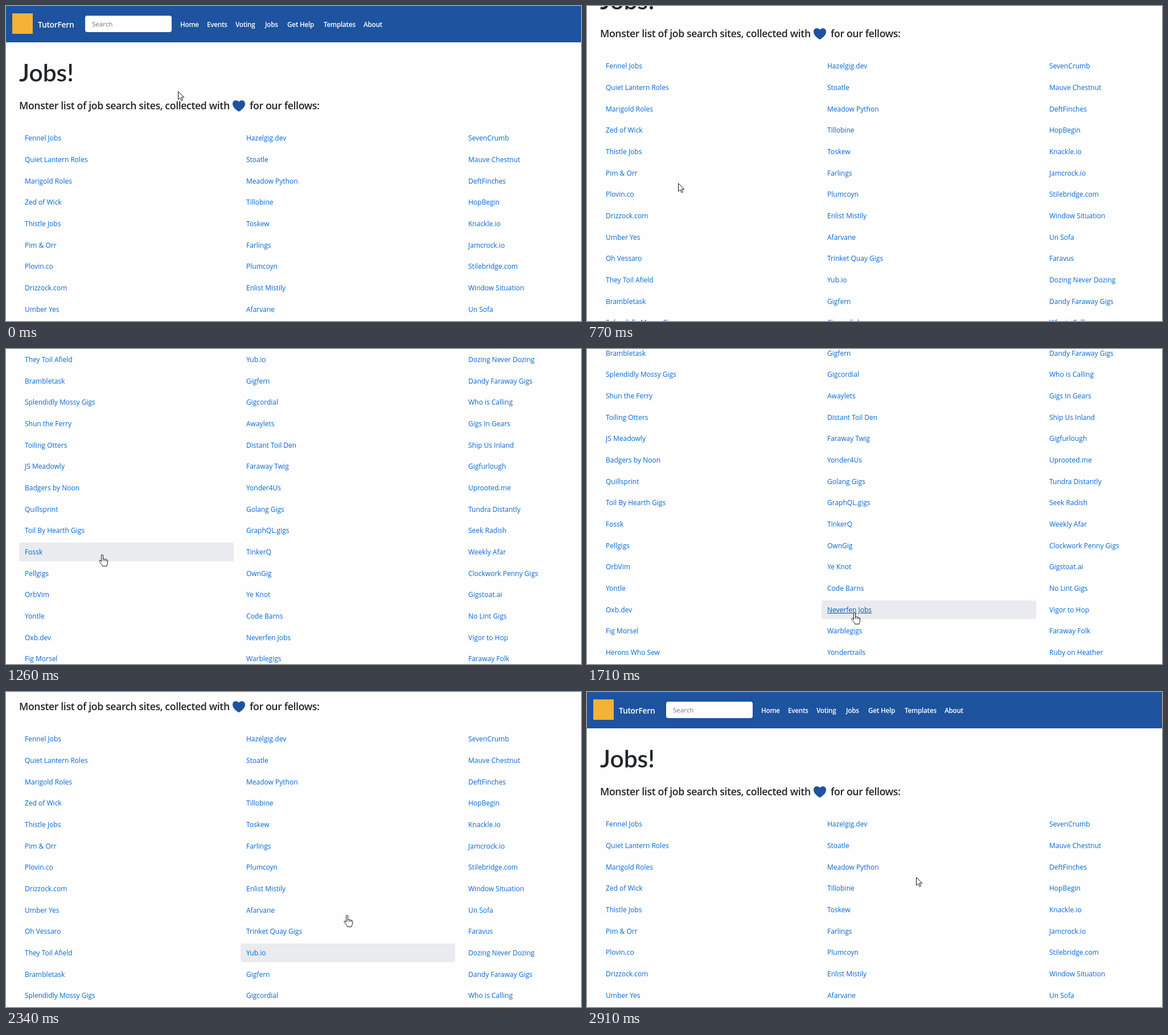
Recreate the animation shown at these times as an HTML page. Size 1010 by 555 pixels, loop 3.18 s.

```html
<!DOCTYPE html>
<html lang="en">
<head>
<meta charset="utf-8">
<title>Jobs</title>
<style>
html, body { margin: 0; width: 100%; height: 100%; overflow: hidden; background: #fefefe; }
#stage { position: relative; width: 1010px; height: 555px; overflow: hidden; font: 12px "Open Sans", "Noto Sans", sans-serif; color: #212529; }
#page { position: absolute; left: 0; top: 0; width: 1010px; height: 1220px; }
#page *, .cursor { position: absolute; white-space: pre; }
header { left: 0; top: 0; width: 1010px; height: 64px; background: #1d539f; color: #fff; font-weight: 600; letter-spacing: -.02em; }
header span { top: 17px; line-height: 31px; font-size: 11.7px; }
#page .brand { left: 56px; font-size: 13.8px; }
.logo { left: 11px; top: 13px; width: 36px; height: 36px; background: #f5b335; }
.search { left: 139px; top: 17px; width: 152px; height: 29px; border-radius: 4px; background: #fff; }
#page .search span { left: 12px; top: 0; line-height: 30px; font-size: 11.6px; font-weight: 400; letter-spacing: 0; color: #6c757d; }
h1, h2 { margin: 0; font-weight: 600; }
h1 { left: 23px; top: 87px; font-family: Lato, "Open Sans", sans-serif; font-size: 42.5px; line-height: 60px; }
h2 { top: 160px; font-size: 17.65px; line-height: 31px; letter-spacing: -.02em; }
.heart { left: 398px; top: 166px; }
.row { width: 377px; height: 33px; border-radius: 3px; line-height: 33px; }
.row.on { background: #e9ebef; }
.row a { left: 10px; top: 0; color: #0366d6; }
.row a.under { color: #0056b3; text-decoration: underline; }
.cursor { left: 0; top: 0; overflow: visible; fill: #fff; stroke: #111; stroke-width: 1; stroke-linejoin: round; }
</style>
</head>
<body>
<div id="stage">
  <div id="page">
    <header>
      <div class="logo"></div>
      <span class="brand">TutorFern</span>
      <div class="search"><span>Search</span></div>
    </header>
    <h1>Jobs!</h1>
    <h2 style="left:23px">Monster list of job search sites, collected with</h2>
    <svg class="heart" width="22" height="20" viewBox="0 0 22 20"><path fill="#1d539f" d="M11 3C9-1 0-1 0 6.5C0 12 5 16 9.5 19.3Q11 20.4 12.5 19.3C17 16 22 12 22 6.5C22-1 13-1 11 3Z"/></svg>
    <h2 style="left:428px">for our fellows:</h2>
  </div>
  <svg class="cursor" id="arrow" width="13" height="19"><path d="M.5.5V14.8L3.8 11.7L6.1 16.8L8.3 15.8L6 10.9H10.6Z"/></svg>
  <svg class="cursor" id="hand" width="17" height="22"><path d="M4.5 12.6V2a1.5 1.5 0 0 1 3 0V8C8.6 7 10.5 7.4 10.5 8.7C11.5 7.9 13.2 8.2 13.2 9.6C14.2 9 15.6 9.5 15.6 10.8V14.5C15.6 17 14 18 14 20.7H6.5C6.2 18.2 3 15.5 1.2 12.5C.2 10.8 2 9.5 3.2 10.8Z"/><path fill="none" d="M7.5 8v3.4M10.5 8.7v3M13.2 9.6v2.5"/></svg>
</div>
<script>
const LOOP = 3180, STEP = 63.3, TOP = 216.3, PITCH = 37.67, ROW = 33;
const LEFT = [23, 412, 802], WIDTH = 377;

const nav = { Home: 306, Events: 353, Voting: 403, Jobs: 455, "Get Help": 494, Templates: 558, About: 628 };

const columns = [
  "Fennel Jobs|Quiet Lantern Roles|Marigold Roles|Zed of Wick|Thistle Jobs|Pim & Orr|Plovin.co|Drizzock.com|Umber Yes|Oh Vessaro|They Toil Afield|Brambletask|Splendidly Mossy Gigs|Shun the Ferry|Toiling Otters|JS Meadowly|Badgers by Noon|Quillsprint|Toil By Hearth Gigs|Fossk|Pellgigs|OrbVim|Yontle|Oxb.dev|Fig Morsel|Herons Who Sew",
  "Hazelgig.dev|Stoatle|Meadow Python|Tillobine|Toskew|Farlings|Plumcoyn|Enlist Mistily|Afarvane|Trinket Quay Gigs|Yub.io|Gigfern|Gigcordial|Awaylets|Distant Toil Den|Faraway Twig|Yonder4Us|Golang Gigs|GraphQL.gigs|TinkerQ|OwnGig|Ye Knot|Code Barns|Neverfen Jobs|Warblegigs|Yondertrails",
  "SevenCrumb|Mauve Chestnut|DeftFinches|HopBegin|Knackle.io|Jamcrock.io|Stilebridge.com|Window Situation|Un Sofa|Faravus|Dozing Never Dozing|Dandy Faraway Gigs|Who is Calling|Gigs In Gears|Ship Us Inland|Gigfurlough|Uprooted.me|Tundra Distantly|Seek Radish|Weekly Afar|Clockwork Penny Gigs|Gigstoat.ai|No Lint Gigs|Vigor to Hop|Faraway Folk|Ruby on Heather"
].map(list => list.split("|"));

// [step, scroll]
const scrollKeys = [[9, 0], [10, 40], [11, 89], [12, 127], [14, 290], [16, 455], [17, 515], [18, 552], [19, 576],
  [20, 591], [22, 620], [23, 632], [25, 640], [29, 640], [30, 625], [31, 580], [32, 515], [34, 345], [36, 215],
  [37, 150], [38, 95], [39, 52], [40, 24], [41, 8], [42, 0]];
// [step, x, y] of the pointer tip
const pointerKeys = [[0, 302, 150], [3, 262, 190], [7, 165, 286], [9, 161, 303], [12, 160, 312], [18, 164, 350],
  [20, 169, 362], [22, 185, 375], [27, 470, 464], [31, 505, 470], [37, 599, 393], [42, 600, 360], [45, 582, 332], [46, 578, 326]];

const $ = id => document.getElementById(id);
const page = $("page"), arrow = $("arrow"), hand = $("hand");

function add(parent, tag, text, style, cls = "") {
  const el = document.createElement(tag);
  el.textContent = text;
  el.className = cls;
  Object.assign(el.style, style);
  return parent.appendChild(el);
}

for (const [name, x] of Object.entries(nav))
  add(document.querySelector("header"), "span", name, { left: x + "px" });

const rows = columns.map((names, c) => names.map((name, r) => {
  const row = add(page, "div", "", { left: LEFT[c] + "px", top: TOP + r * PITCH + "px" }, "row");
  add(row, "a", name, {});
  return row;
}));

function sample(keys, k) {
  if (k <= keys[0][0]) return keys[0].slice(1);
  const i = keys.findIndex(key => key[0] >= k);
  if (i < 0) return keys[keys.length - 1].slice(1);
  const a = keys[i - 1], b = keys[i], f = (k - a[0]) / (b[0] - a[0]);
  return a.slice(1).map((v, j) => v + (b[j + 1] - v) * f);
}

function rowAt(x, y) {
  const c = LEFT.findIndex(l => x >= l && x < l + WIDTH);
  const r = Math.floor((y - TOP) / PITCH);
  return c >= 0 && r >= 0 && y - TOP - r * PITCH < ROW ? rows[c][r] : undefined;
}

let lit, last = -1;

function draw(k) {
  const [x, y] = sample(pointerKeys, k).map(Math.round);
  page.style.transform = `translateY(${-Math.round(sample(scrollKeys, k)[0])}px)`;

  // hover trails the scroll by one step
  const pageY = y + sample(scrollKeys, k - 1)[0];
  const over = rowAt(x, pageY);
  if (lit) {
    lit.classList.remove("on");
    lit.firstChild.className = "";
  }
  if (over) {
    const link = over.firstChild;
    const dx = x - over.offsetLeft - 10, dy = pageY - over.offsetTop;
    over.classList.add("on");
    if (dx >= 0 && dx <= link.offsetWidth && dy > 8 && dy < 26) link.className = "under";
  }
  lit = over;

  arrow.style.display = over ? "none" : "block";
  hand.style.display = over ? "block" : "none";
  arrow.style.transform = `translate(${x}px, ${y}px)`;
  hand.style.transform = `translate(${x - 6}px, ${y}px)`;
}

const start = performance.now();
function tick() {
  const t = (performance.now() - start) % LOOP;
  const k = Math.min(46, Math.floor((t + 10) / STEP));
  if (k !== last) draw(last = k);
  requestAnimationFrame(tick);
}
tick();
</script>
</body>
</html>
```
